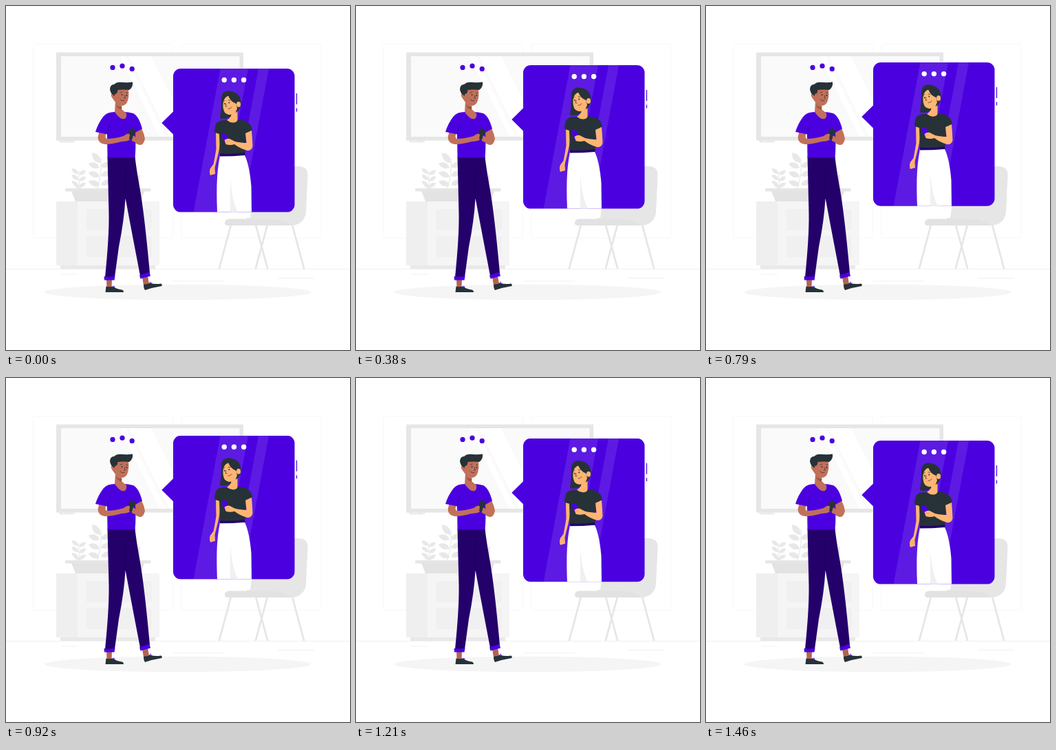
Recreate the animation shown at these times as an HTML page. Size 500 by 500 pixels, loop 1500 ms.

```html
<!DOCTYPE html>
<html lang="en">
<head>
<meta charset="utf-8">
<title>Video chat</title>
<style>
  html, body { margin: 0; height: 100%; overflow: hidden; background: #fff; }
  svg { display: block; width: 100vw; height: 100vh; }
  .violet { fill: #4b00e0; }
  .navy { fill: #24006b; }
  .ink { fill: #263238; }
  .tan { fill: #c2705a; }
  .peach { fill: #ffb573; }
  .line { fill: none; stroke-linecap: round; stroke-linejoin: round; }
</style>
</head>
<body>
<svg viewBox="0 0 500 500">
  <defs>
    <path id="leaf" d="M0 0C3 -6 9 -6 13 -4C10 2 5 3 0 0Z"/>
    <clipPath id="card"><rect x="243" y="91" width="176.5" height="208.6" rx="11"/></clipPath>
  </defs>

  <!-- room -->
  <g fill="none" stroke="#f8f8f8">
    <rect x="39.5" y="55.5" width="203" height="282" rx="3"/>
    <rect x="255" y="55.5" width="203" height="282" rx="3"/>
    <path d="M0 382.5H500M80 390H104M243 400H318M395 395.500H448" stroke="#f1f1f1"/>
  </g>
  <ellipse cx="249.500" cy="416" rx="194" ry="11.300" fill="#f5f5f5"/>

  <!-- television -->
  <path d="M77 194H100V196Q100 198.500 97 198.500H80Q77 198.500 77 196Z" fill="#ebebeb"/>
  <path d="M82 196h2m2 0h2m8 0h2" stroke="#fff"/>
  <path d="M73 67.500H345V195.500H73Z" fill="#e6e6e6"/>
  <path d="M80 73H339.500V190H80Z" fill="#fafafa"/>
  <path d="M165 73H174L232 190H223ZM179 73H211L269 190H237Z" fill="#fff"/>

  <!-- cabinet and plants -->
  <path d="M79 376H217V382H79Z" fill="#e9e9e9"/>
  <path d="M73 284H223V377H73Z" fill="#f5f5f5"/>
  <path d="M73 284H104V377H73Z" fill="#efefef"/>
  <g fill="#f0f0f0">
    <rect x="116.500" y="295" width="95" height="31" rx="3"/>
    <rect x="116.500" y="334" width="95" height="31" rx="3"/>
  </g>
  <g id="plants" fill="#e8e8e8">
    <path class="line" d="M109 266Q104 253 106 240M132 266Q140 246 138 221M187 266Q188 256 192 248" stroke="#e8e8e8" stroke-width="1.2"/>
  </g>
  <path d="M95 269H201L196 284H101Z" fill="#e3e3e3"/>
  <rect x="86" y="265" width="124.500" height="4.500" rx="1.500" fill="#e6e6e6"/>

  <!-- chair -->
  <path class="line" d="M327 318L310 381M363 318L380 381M380 318L363 381M416 318L433 381" stroke="#e6e6e6" stroke-width="2.800"/>
  <path d="M364 245Q365 233 376 233H426Q439 234 438.500 246L436 300Q434 316 417 319H350V308H355Z" fill="#e6e6e6"/>
  <path d="M323 309.500H385Q404 310 414 319H322Q318 319 318 315Q318 311 323 309.500Z" fill="#e2e2e2"/>

  <!-- man -->
  <g class="violet">
    <circle cx="155" cy="89.400" r="3.600"/>
    <circle cx="169" cy="87.200" r="3.600"/>
    <circle cx="183.200" cy="91.400" r="3.600"/>
  </g>
  <path d="M146 397H154L153.500 409H146.500ZM198 394L206 392L208 404L200 406Z" fill="#b26451"/>
  <path class="ink" d="M145.500 407.500Q150 409 155 407.500Q162 412 169 412.500Q171.500 414 171 416H144.500ZM200.500 404.500Q206 405 209 402.500Q217 405 225 403.500Q227.500 404.500 226.500 407Q214 409 202 413Q199 408 200.500 404.500Z"/>
  <path class="line" d="M154 409l3 -2 1 3M208 404l2 -3 2 3" stroke="#4b00e0" stroke-width=".8"/>
  <path class="navy" d="M147.500 219H187.500Q189 234 194 262Q201 300 209 388L195 392Q184 335 173.500 279Q172 310 164 350L158 394H144Q150 335 149.500 302Z"/>
  <path class="line" d="M174 236Q172 260 173.500 280" stroke="#180050"/>
  <path class="violet" d="M142.500 393Q150 394 158.500 392.500L157.500 398.500H143ZM194 391.500L208.500 386.500L210 392.500L195.500 396.500Z"/>
  <path class="tan" d="M136 180L146 184Q143 191 146 193Q158 193 171 189Q176 184 181 186L181 194Q176 197 168 197Q154 201 144 201Q134 200 133.500 191ZM187 182L197 178Q201 186 202 193Q200 202 195 202Q189 201 186 197Z"/>
  <path class="violet" d="M158 154Q147 154 142 160Q134 170 130 183L147 186.500L147.500 220.500H187.500Q189 205 188 184L198 178.500Q193 160 185 156Q178 154 170 154Z"/>
  <path class="line" d="M151 172Q148 180 147.500 188" stroke="#3500a8" stroke-width=".8"/>
  <path class="tan" d="M146 193Q158 193 171 189Q176 184 181 186L181 194Q176 197 168 197Q154 201 144 201ZM182 189Q187 187 189 192L195 195L194 202Q188 198 183 196Z"/>
  <path class="ink" d="M180.500 185H185.500L183.500 193Q181 196 179 193Z"/>
  <circle class="ink" cx="183" cy="183" r="5"/>
  <path class="tan" d="M159 138L158 154Q166 166 172.500 164Q176 162 175 156L168 150V143Z"/>
  <path d="M160 143Q163 147 168.500 146L168 151Q161 149 160 143Z" fill="#9d5647"/>
  <path class="tan" d="M158 121Q170 118 178 122Q179.500 133 175.500 141Q170 148 162 143Q157 138 154 133Q151 128 155 126Z"/>
  <path class="ink" d="M154 128Q150 123 151.500 118Q153 114 157 114Q161 109.500 170 111Q178 111.500 184 110.500Q185 118 179 122Q171 121 162.500 122Q162 128 158 128L158 131Z"/>
  <g class="ink">
    <circle cx="168.500" cy="129" r="1"/>
    <circle cx="175.300" cy="130" r="1"/>
  </g>
  <path class="line" d="M166 126l3 -1M174.500 126l2 .5M172 130l1.500 4h-2M166 136Q169 139 172 137.500" stroke="#263238" stroke-width=".7"/>

  <!-- floating card -->
  <g id="float">
    <path class="violet" d="M244 152.500L226.300 170L244 187.500Z"/>
    <path d="M422.500 127V143M422.500 148.500V153.500" stroke="#4b00e0" stroke-width="1.200"/>
    <g clip-path="url(#card)">
      <path class="violet" d="M243 91H420V300H243Z"/>
      <path d="M311.500 91H352L313 300H272.500ZM367 91H382L343 300H328Z" fill="#fff" opacity=".1"/>
      <g fill="#fff">
        <circle cx="317.200" cy="107.500" r="3.700"/>
        <circle cx="331.400" cy="107.500" r="3.700"/>
        <circle cx="345.600" cy="107.500" r="3.700"/>
      </g>
      <path class="ink" d="M313 138Q312 125 322 123.500Q333 123 339 131Q343 138 340 147L334 159Q321 165 311 163.500Q313 150 313 138Z"/>
      <path class="peach" d="M305 182L311.500 185Q312 200 308.500 215L303.500 235L304 244L297 246Q295 241 297 236L301.500 230Q304 218 305.500 208Z"/>
      <path d="M298 238L303.500 236M297.500 241L303 240" stroke="#e79a55" stroke-width=".6"/>
      <path fill="#fff" d="M311 217H347Q354 232 356.500 262L357 300H307Q305 255 309 229Z"/>
      <path fill="#f0f0f0" d="M326 248Q328 282 337 300H326Z"/>
      <path class="ink" d="M320 166Q308 166 305.500 171Q302.500 178 303.500 184L310 186L311 216H347Q350 200 348 186L358 180Q356 170 348 167Q342 165 336 165Z"/>
      <path class="navy" d="M311 214.500Q330 216 347 213L347.500 217Q330 218.500 311 218.500Z"/>
      <path class="violet" d="M348.500 185L350.500 197L347.500 201ZM312.500 186L319.500 185L324 196L317 198Z"/>
      <path class="peach" d="M348 185L357 181Q358 192 358.500 204Q357 211 350 210Q340 207 332 201Q326 203 319.500 201L317.500 195Q323 191 327 194L333 197Q343 199 349.500 199Z"/>
      <path d="M319 197L325 196" stroke="#e79a55" stroke-width=".6"/>
      <path class="peach" d="M328 153L327 160Q323 165 321 166Q326 170 331 169.500Q336 169 336.500 165.500V148Z"/>
      <path class="peach" d="M322 131Q316 134 315.500 142Q315 150 318 155Q323 160 329 157Q333 153 335 149Q340 149 341 143Q341 138 336 140Q330 138 326 131Z"/>
      <path class="ink" d="M323 130Q326 139 334.500 142L336 149L333.500 155Q339 153 341.500 143Q342 131 333 126Z"/>
      <ellipse class="peach" cx="338" cy="143" rx="3" ry="4"/>
      <g class="ink">
        <circle cx="317.800" cy="142" r="1"/>
        <circle cx="324.300" cy="140.500" r="1"/>
      </g>
      <path class="line" d="M316 138.500l2 -1M323 137l3 0M320 142l-1 4 2 0M323 149.500Q326 149.500 328 147" stroke="#263238" stroke-width=".7"/>
    </g>
  </g>
</svg>
<script>
  const SVG = "http://www.w3.org/2000/svg";
  const plants = document.getElementById("plants");

  // x, y, rotation and scale of each leaf
  function leaf(x, y, turn, size) {
    const el = document.createElementNS(SVG, "use");
    el.setAttribute("href", "#leaf");
    el.setAttribute("transform", `translate(${x} ${y}) rotate(${turn}) scale(${size})`);
    plants.append(el);
  }
  for (let i = 0; i < 3; i++) {
    leaf(106, 245 + 9 * i, -14, .86);
    leaf(105, 244 + 9 * i, 236, .9);
    leaf(138, 234 + 13 * i, -8, 1.2);
    leaf(136, 235 + 13 * i, 218, 1.25);
    leaf(189, 259 - 4 * i, -25, .6);
  }
  leaf(137, 228, 248, 1.4);
  leaf(109, 264, 217, .8);

  const LOOP = 1500, STEPS = 36, RISE = 10;
  const card = document.getElementById("float");

  // linear rise and fall in 24 steps per second
  function draw(now) {
    const step = Math.floor((now % LOOP + 5) * STEPS / LOOP) % STEPS;
    const phase = (step + .5) / STEPS;
    const lift = RISE * (1 - Math.abs(1 - 2 * phase));
    card.setAttribute("transform", `translate(0 ${.28 - lift})`);
    requestAnimationFrame(draw);
  }
  draw(performance.now());
</script>
</body>
</html>
```
